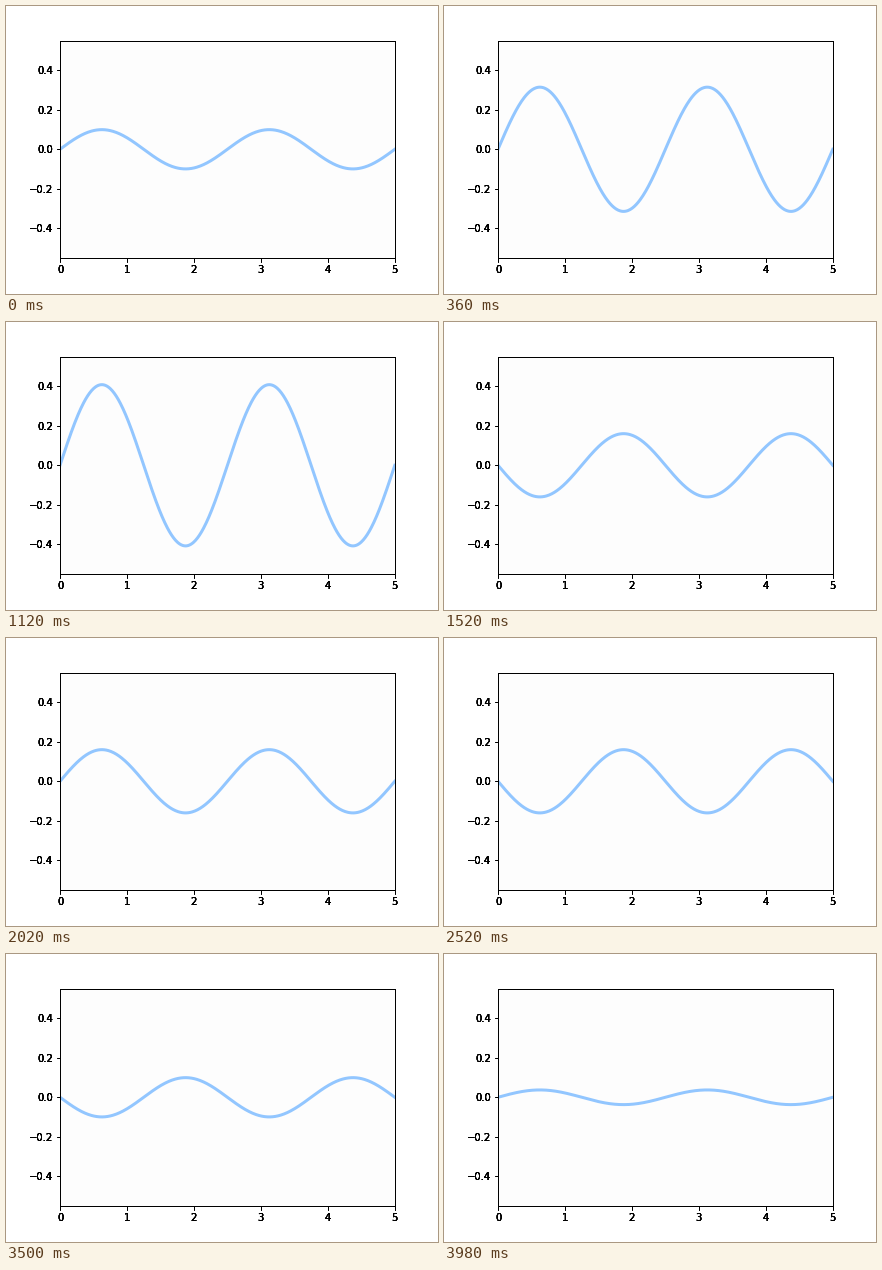
Write a matplotlib script that moves like this. It is 432 px wide and 288 px high and loops after 4000 ms.

```python
import numpy as np
import matplotlib.pyplot as plt
from matplotlib.animation import FuncAnimation

FRAMES = 200
INTERVAL = 20      # ms
PERIOD = 50        # frames per oscillation
PHASE = 0.2
AMPLITUDE = 0.5
LAYERS = 5         # repeated passes give the heavy, dark axis lettering

plt.rcParams["font.family"] = "DejaVu Sans"
plt.rcParams["font.size"] = 10

fig = plt.figure(figsize=(6, 4), dpi=72, facecolor="white")


def add_layer(background):
    ax = fig.add_axes([0.125, 0.125, 0.775, 0.755])
    ax.set_facecolor(background)
    ax.set(xlim=(0, 5), ylim=(-0.55, 0.55))
    ax.set_xticks(range(6))
    ax.set_yticks([-0.4, -0.2, 0.0, 0.2, 0.4])
    return ax


ax = add_layer("#fdfdfd")
for _ in range(LAYERS - 1):
    add_layer("none")

x = np.linspace(0, 5, 500)
shape = AMPLITUDE * np.sin(2 * np.pi * x / 2.5)
line, = ax.plot(x, shape, color="#92c6ff", lw=3)


def update(i):
    line.set_ydata(shape * np.sin(2 * np.pi * i / PERIOD + PHASE))
    return line,


anim = FuncAnimation(fig, update, frames=FRAMES, interval=INTERVAL,
                     repeat=True, repeat_delay=0, blit=False)
plt.show()
```
